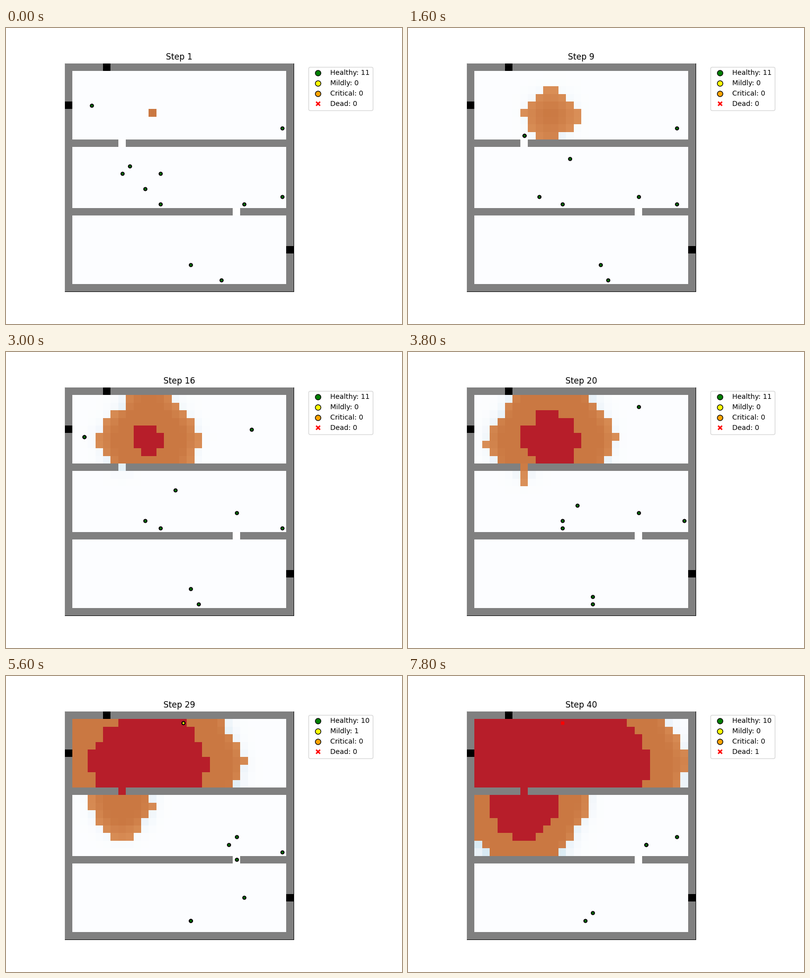
A matplotlib script for the animation above (8000 ms loop, 800 by 600 pixels).

```python
import numpy as np
import matplotlib
import matplotlib.pyplot as plt
from matplotlib.animation import FuncAnimation
from matplotlib.lines import Line2D

N, STEPS = 30, 40
rng = np.random.default_rng(4)

# ---------------------------------------------------------------- building
DOORS = [(10, 7), (19, 22)]
EXITS = [(0, 5), (5, 0), (24, 29)]
wall = np.zeros((N, N), bool)
wall[[0, 10, 19, 29], :] = True
wall[:, [0, 29]] = True
for cell in DOORS:
    wall[cell] = False
free = ~wall

# ---------------------------------------------------------------- fire
ROW, COL = np.mgrid[:N, :N]
BURN = 9.6          # steps a flame lasts before it turns to ember


def arrival(row, col, start, speed, squash=1.0):
    """Step at which a rounded-diamond front reaches each cell."""
    p = 1.3
    dist = (np.abs(COL - col) ** p
            + np.abs((ROW - row) * squash) ** p) ** (1 / p)
    return start + dist / speed


def ignition():
    first_room = arrival(6.3, 10.5, 1, 0.46)
    second_room = arrival(11.5, 7, 18.5, 0.4, squash=0.8)
    t = np.where(ROW < 10, first_room, second_room)
    t = np.maximum(t + rng.normal(0, 0.5, t.shape), 2)
    t[6, 11] = 1
    t[DOORS[0]] = 18
    t[wall | (ROW > 18)] = np.inf
    return t


# ---------------------------------------------------------------- smoke
def box_sum(a):
    p = np.pad(a, 1)
    return sum(p[i:i + N, j:j + N] for i in range(3) for j in range(3))


def spread(s):
    mean = box_sum(s * free) / np.maximum(box_sum(free.astype(float)), 1)
    return (s + 0.8 * (mean - s)) * free


def rgb(*c):
    return np.array(c) / 255


BLUES = matplotlib.colormaps["Blues"]
FLAME_NEW, FLAME_OLD = rgb(219, 145, 89), rgb(202, 120, 66)
EMBER = rgb(183, 30, 42)


def paint_grid(smoke, flame, ember):
    img = 0.7 + 0.3 * BLUES(smoke)[..., :3]
    for cell in DOORS:
        if smoke[cell] < 0.005:
            img[cell] = 1
    age = np.clip((smoke - 0.25) / 0.7, 0, 1)[..., None]
    img = np.where(flame[..., None],
                   FLAME_NEW + (FLAME_OLD - FLAME_NEW) * age, img)
    img[ember] = EMBER
    img[wall] = rgb(128, 128, 128)
    for cell in EXITS:
        img[cell] = 0
    return img


def build_grids():
    grids, smoke, lit = [], np.zeros((N, N)), ignition()
    smoke[6, 11] = 1
    for step in range(1, STEPS + 1):
        flame = lit <= step
        if step > 1:
            smoke = spread(smoke)
            smoke[flame] = np.minimum(1, smoke[flame] + 0.2)
        grids.append(paint_grid(smoke, flame, lit + BURN <= step))
    return grids


GRIDS = build_grids()

# ---------------------------------------------------------------- people
# key points: step, column, row
LEAVING = [
    [(1, 3, 5), (5, 1, 4), (7, 1, 5)],
    [(1, 8, 13), (9, 7, 9), (12, 4, 9), (17, 1, 5)],
    [(1, 7, 14), (5, 6, 14), (9, 7, 9), (12, 4, 9), (17, 1, 5)],
    [(1, 12, 14), (12, 13, 11), (20, 14, 15), (28, 22, 18), (30, 22, 20),
     (35, 26, 24), (37, 28, 24)],
    [(1, 23, 18), (12, 21, 16), (20, 22, 16), (25, 22, 20), (29, 23, 24),
     (34, 28, 24)],
]
STAYING = [
    [(1, 10, 16), (5, 9, 17), (12, 9, 17), (20, 12, 17), (29, 21, 17),
     (35, 21, 17), (40, 23, 17)],
    [(1, 12, 18), (20, 12, 18), (29, 22, 16), (35, 21, 17), (40, 23, 17)],
    [(1, 28, 17), (5, 28, 18), (12, 27, 18), (20, 28, 17), (29, 28, 18),
     (35, 28, 17), (40, 27, 16)],
    [(1, 16, 26), (12, 17, 26), (20, 16, 27), (29, 16, 27), (35, 15, 25),
     (40, 15, 27)],
    [(1, 20, 28), (5, 19, 27), (12, 17, 28), (26, 16, 28), (29, 16, 27),
     (35, 16, 26)],
]
VICTIM = [(1, 28, 8), (6, 28, 8), (12, 26, 8), (20, 22, 2), (33, 12, 1)]
WORSENS = (28, 32, 34)      # mildly, critical, dead


def place(path, step):
    t, c, r = zip(*path)
    return round(np.interp(step, t, c)), round(np.interp(step, t, r))


# ---------------------------------------------------------------- figure
STATES = {"Healthy": "green", "Mildly": "yellow",
          "Critical": "orange", "Dead": "red"}


def marker(name):
    return "X" if name == "Dead" else "o"


fig, ax = plt.subplots(figsize=(8, 6), dpi=100)
fig.subplots_adjust(left=0.125, right=0.75, bottom=0.11, top=0.88)
grid = ax.imshow(GRIDS[0], interpolation="nearest", zorder=3)
ax.set_xticks([])
ax.set_yticks([])
title = ax.set_title("Step 1")

dots, handles = [], []
for name, color in STATES.items():
    dead = name == "Dead"
    dots.append(ax.scatter([], [], s=20, marker=marker(name), color=color,
                           edgecolors="red" if dead else "black",
                           linewidths=1 if dead else 1.5, zorder=4))
    handles.append(Line2D([], [], marker=marker(name), color="w", mfc=color,
                          mec="w" if dead else "black", ms=8))
ax.set_xlim(-0.5, N - 0.5)
ax.set_ylim(N - 0.5, -0.5)
legend = ax.legend(handles, [f"{n}: 0" for n in STATES], loc="upper left",
                   bbox_to_anchor=(1.05, 1))


def draw(i):
    step = i + 1
    grid.set_data(GRIDS[i])
    title.set_text(f"Step {step}")

    state = sum(step >= first for first in WORSENS)
    groups = [[] for _ in STATES]
    groups[0] = [place(p, step) for p in STAYING]
    groups[0] += [place(p, step) for p in LEAVING if step <= p[-1][0]]
    groups[state].append(place(VICTIM, step))
    counts = [len(STAYING) + len(LEAVING), 0, 0, 0]
    counts[state] += 1

    for dot, cells in zip(dots, groups):
        dot.set_offsets(np.array(cells, float).reshape(-1, 2))
    for text, name, n in zip(legend.get_texts(), STATES, counts):
        text.set_text(f"{name}: {n}")
    return [grid, title, legend, *dots]


anim = FuncAnimation(fig, draw, frames=STEPS, interval=200, repeat=True,
                     repeat_delay=0, init_func=lambda: draw(0))
plt.show()
```
